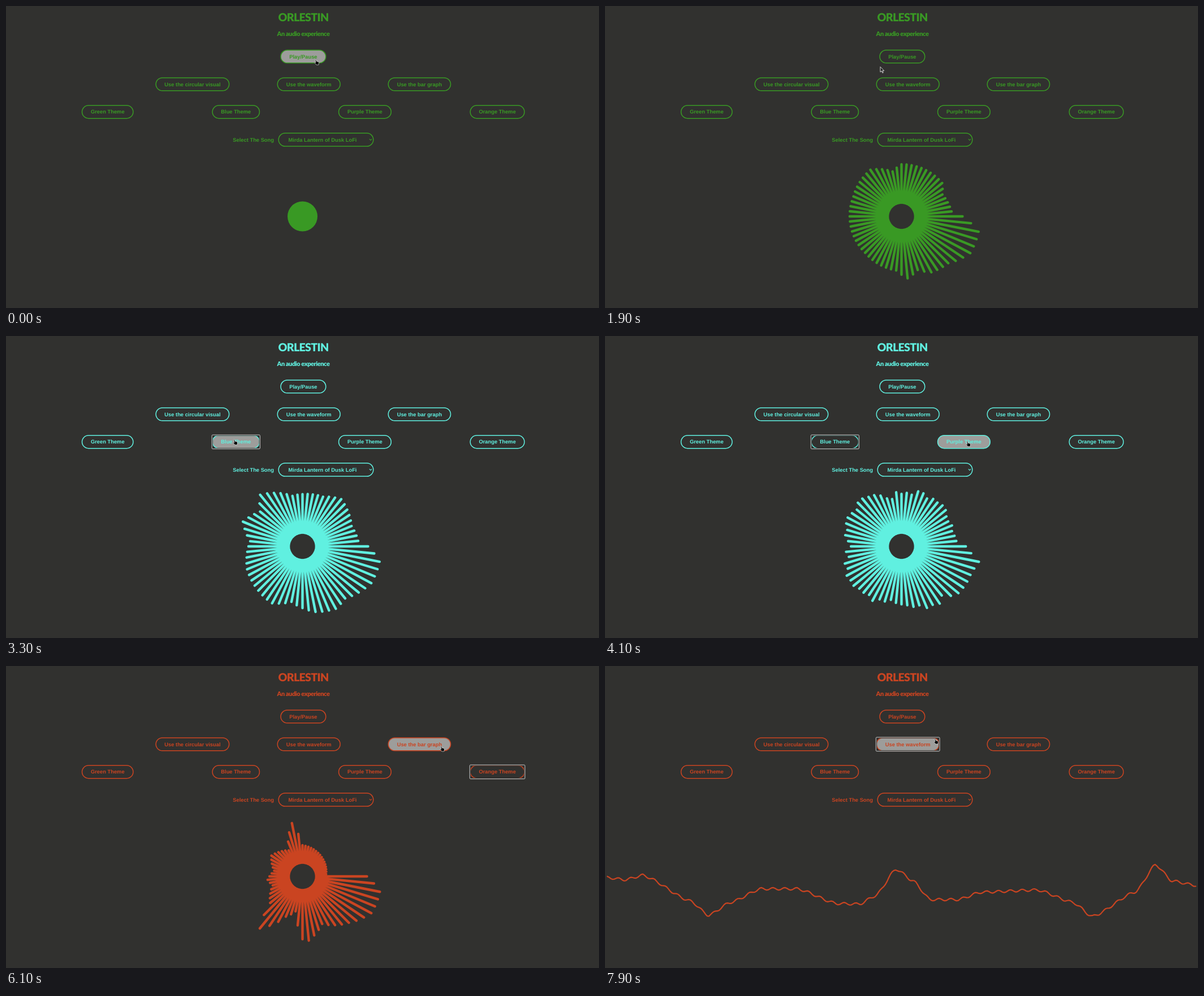
An HTML page that plays this animation: 1049 by 534 pixels, repeating every 8 s.

```html
<!DOCTYPE html>
<html lang="en">
<head>
<meta charset="utf-8">
<title>Audio visualizer</title>
<style>
  html, body { margin: 0; width: 100%; height: 100%; overflow: hidden; background: #31312f; }
  svg { display: block; width: 1049px; height: 534px; }
  text {
    font: bold 9.35px "Liberation Sans", Arial, sans-serif;
    fill: currentColor;
    text-rendering: geometricPrecision;
  }
  .mid { text-anchor: middle; }
  .title { font: 900 19.6px Lato, sans-serif; letter-spacing: -.7px; }
  .sub { font: 900 11px Lato, sans-serif; letter-spacing: -.45px; }
  .pill { fill: none; stroke: currentColor; stroke-width: 1.5; }
  .hover .pill { fill: #9d9d9b; }
  .ring { fill: none; visibility: hidden; }
  .focus .ring { visibility: visible; }
  .gap { stroke: #31312f; stroke-width: 1.5; }
  .line { stroke: #dcdcdc; stroke-width: .9; }
  #visual { fill: none; stroke: currentColor; stroke-linecap: round; stroke-linejoin: round; }
  #arrow { fill: #222; stroke: #e4e4e4; stroke-width: .9; }
  #hand { fill: #000; stroke: #fff; stroke-width: .6; }
</style>
</head>
<body>
<svg id="stage" viewBox="0 0 1049 534">
  <clipPath id="canvas"><rect x="3.2" y="255" width="1042.9" height="240.4"/></clipPath>
  <text class="mid title" x="526" y="26.8">ORLESTIN</text>
  <text class="mid sub" x="526" y="52.6">An audio experience</text>
  <g id="buttons"></g>
  <text x="401.3" y="239.6">Select The Song</text>
  <rect class="pill" x="482.2" y="224.7" width="167.6" height="23.3" rx="11.6"/>
  <text x="499.5" y="239.6">Mirda Lantern of Dusk LoFi</text>
  <path d="M642.8 235.2l2.2 2.2 2.2-2.2" fill="none" stroke="currentColor" stroke-width="1.1"/>
  <g clip-path="url(#canvas)"><path id="visual"/></g>
  <circle id="idle" cx="524.5" cy="372" r="26.5" fill="currentColor"/>
  <g id="cursor">
    <path id="arrow" d="M0 0V9.4L2.3 7.4 3.9 10.9 5.3 10.3 3.8 6.9H6.7Z"/>
    <path id="hand" d="M0 .3c.7-.7 1.5-.1 1.7.7l.5 2.2 2.9.7c1 .3 1.4.9 1.3 2l-.4 3.6h-4l-2.8-3.3c-.6-.9.3-1.5 1-.9l.7.5z"/>
  </g>
</svg>
<script>
const $ = id => document.getElementById(id);
const LOOP = 8000, STEP = 100, COUNT = 64;
const CX = 524.5, CY = 372, REST = 26.5, PEAK = 141.5;
const BASE = 495, BAR = 16.28, GAIN = .917;

// label, left, row, width
const BUTTONS = [
  ["Play/Pause", 485.3, 0, 81.2],
  ["Use the circular visual", 264.4, 1, 131],
  ["Use the waveform", 479.5, 1, 112.4],
  ["Use the bar graph", 675.5, 1, 111.8],
  ["Green Theme", 133.8, 2, 91.9],
  ["Blue Theme", 364.4, 2, 84.8],
  ["Purple Theme", 587.8, 2, 94.2],
  ["Orange Theme", 820.5, 2, 97.3]
].map(([label, x, row, w]) => ({ label, x, y: 77.3 + row * 48.9, w }));
const HEIGHT = 24.3;

const THEMES = [[0, "#399924"], [3000, "#60f0e0"], [4300, "#7211b2"], [5100, "#ca4421"]];
const FOCUS = [[0, -1], [3000, 5], [4300, 6], [5100, 7], [6500, 3], [7500, 2]];
const MODES = [[0, "idle"], [200, "circle"], [6500, "bars"], [7500, "wave"]];

// time, x, y of the pointer tip
const POINTER = [
  [0, 547, 94.5], [1300, 547, 94.5], [1900, 487, 107.5], [2900, 403, 183], [3400, 403, 183],
  [4100, 640, 186], [4500, 640, 186], [4800, 806, 185], [5000, 866, 187], [5500, 866, 187],
  [6000, 769, 141.5], [6500, 769, 141.5], [6800, 685.5, 153], [7400, 583, 128.5], [8000, 583, 128.5]
];

// Turning points of each spectrum: spoke number (clockwise from the right), outer radius
const silent = [[0, REST], [63, REST]];
const green = [
  [0, 110], [2, 141], [5, 140], [8, 119], [11, 114], [13, 101], [15, 112], [17, 98],
  [24, 93], [36, 94], [42, 101], [46, 83], [48, 94], [57, 95], [59, 84], [63, 91]
];
const blue = [
  [0, 118], [2, 141], [5, 140], [9, 121], [11, 127], [14, 120], [18, 102], [21, 116], [28, 108],
  [33, 95], [36, 116], [39, 99], [41, 120], [46, 93], [52, 97], [55, 110], [60, 96], [63, 101]
];
const purple = [
  [0, 113], [2, 141], [7, 131], [9, 117], [17, 103], [24, 102], [27, 118], [29, 104],
  [32, 95], [36, 107], [41, 106], [46, 90], [48, 101], [56, 105], [59, 92], [63, 93]
];
const orange = [
  [0, 116], [2, 142], [5, 140], [8, 118], [12, 93], [15, 116], [16, 113], [18, 65], [20, 79],
  [23, 121], [25, 76], [29, 57], [31, 64], [34, 53], [38, 68], [43, 54], [46, 98], [48, 57], [63, 44]
];
// The same for the bars: bar number, top edge
const graph = [
  [0, 384], [1, 370], [4, 371], [9, 416], [13, 443], [15, 413], [16, 416], [18, 457], [20, 450],
  [23, 399], [26, 438], [28, 436], [30, 374], [31, 373], [33, 434], [42, 450], [46, 431],
  [48, 460], [50, 460], [60, 447], [61, 421], [63, 439]
].map(([i, y]) => [i, REST + (BASE - y) * GAIN]);

const SPECTRA = [
  [0, silent], [100, silent], [400, green], [1900, green], [3300, blue],
  [4800, purple], [6100, orange], [6800, graph], [LOOP, graph]
];

// Slow shape of the wave, closed after PERIOD
const PERIOD = 1096;
const SWELL = [
  [4, 374], [36, 378], [67, 370], [152, 416], [183, 441], [222, 418], [276, 394], [340, 394],
  [410, 420], [450, 421], [479, 406], [515, 359], [545, 380], [575, 413], [625, 413], [665, 400],
  [765, 396], [828, 418], [862, 443], [939, 399], [974, 351], [1003, 380], [1046, 388], [1100, 374]
];

const lerp = (a, b, p) => a + (b - a) * p;
const smooth = p => p * p * (3 - 2 * p);
const active = (list, t) => list.filter(k => k[0] <= t).pop()[1];

function span(keys, t) {
  const next = keys.findIndex(k => k[0] > t);
  const i = next < 0 ? keys.length - 1 : next;
  const a = keys[i - 1], b = keys[i];
  return [a, b, (t - a[0]) / (b[0] - a[0])];
}

function curve(points, x, ease = p => p) {
  const [a, b, p] = span(points, x);
  return lerp(a[1], b[1], ease(p));
}

function noise(i, t) {
  const s = Math.sin(i * 12.9898 + t * .0782) * 43758.5453;
  return s - Math.floor(s) - .5;
}

function levels(t) {
  const [[, a], [, b], p] = span(SPECTRA, t);
  const sway = 10 * Math.sin(Math.PI * p);
  return Array.from({ length: COUNT }, (_, i) =>
    Math.min(PEAK, lerp(curve(a, i), curve(b, i), p) + sway * noise(i, t)));
}

function waveY(x) {
  const ripple = 2.2 * Math.cos((x - 276) / 21 * 2 * Math.PI);
  return curve(SWELL, x, p => lerp(p, smooth(p), .5)) - ripple;
}

const draw = {
  idle: () => "",
  circle: t => levels(t).map((r, i) => {
    const turn = i / COUNT * 2 * Math.PI, c = Math.cos(turn), s = Math.sin(turn);
    const at = d => (CX + c * d).toFixed(2) + " " + (CY + s * d).toFixed(2);
    return `M${at(24.2)}L${at(r - 2)}`;
  }).join(""),
  bars: t => levels(t).map((r, i) => {
    const h = (r - REST) / GAIN;
    return `M${3.5 + i * BAR} ${BASE}v${-h}h${BAR}v${h}z`;
  }).join(""),
  wave: t => {
    const shift = (LOOP - STEP - t) / STEP * 75;
    const points = [];
    for (let x = 4; x <= 1046; x += 3) points.push(`${x} ${waveY(4 + (x - 4 + shift) % PERIOD)}`);
    return "M" + points.join("L");
  }
};
const WIDTH = { idle: 0, circle: 4.4, bars: 2, wave: 2.2 };

$("buttons").innerHTML = BUTTONS.map(({ label, x, y, w }) => {
  const rect = (cls, pad, rx) => `<rect class="${cls}" x="${x + pad}" y="${y + pad}"
    width="${w - 2 * pad}" height="${HEIGHT - 2 * pad}" rx="${rx}"/>`;
  return `<g>${rect("pill", .75, 11.4)}${rect("ring gap", .75, 1)}${rect("ring line", -.2, 1.5)}
    <text class="mid" x="${x + w / 2}" y="${y + 15.3}">${label}</text></g>`;
}).join("");
const groups = [...$("buttons").children];

function render(t) {
  const mode = active(MODES, t);
  $("stage").style.color = active(THEMES, t);
  $("visual").setAttribute("d", draw[mode](t));
  $("visual").style.strokeWidth = WIDTH[mode];
  $("idle").style.display = mode === "idle" ? "" : "none";

  const [a, b, p] = span(POINTER, t);
  const x = lerp(a[1], b[1], smooth(p)), y = lerp(a[2], b[2], smooth(p));
  const over = BUTTONS.findIndex(k => x > k.x && x < k.x + k.w && y > k.y && y < k.y + HEIGHT);
  const focus = active(FOCUS, t);
  groups.forEach((g, i) => {
    g.classList.toggle("hover", i === over);
    g.classList.toggle("focus", i === focus);
  });
  $("cursor").setAttribute("transform", `translate(${x} ${y})`);
  $("hand").style.display = over < 0 ? "none" : "";
  $("arrow").style.display = over < 0 ? "" : "none";
}

function tick() {
  render(Math.floor(performance.now() % LOOP / STEP) * STEP);
  requestAnimationFrame(tick);
}
tick();
</script>
</body>
</html>
```
